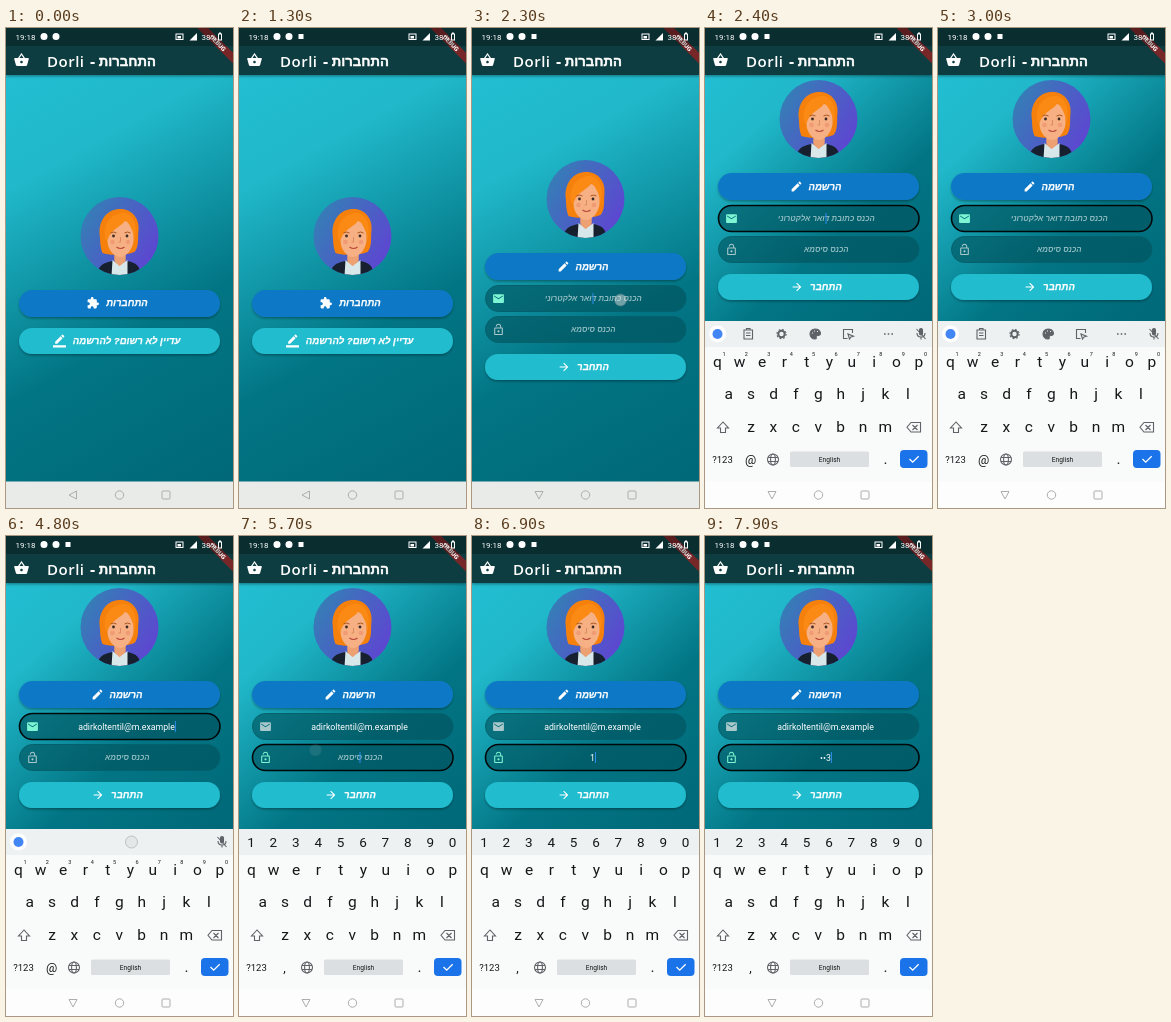
These frames come from a looping animation (227 by 480 pixels, 8000 ms). An HTML page:

```html
<!DOCTYPE html>
<html lang="he">
<head>
<meta charset="utf-8">
<title>התחברות</title>
<style>
html, body { margin: 0; width: 100%; height: 100%; overflow: hidden; background: #073c40; }
svg { display: block; width: 227px; height: 480px; }
text { font-family: Roboto, sans-serif; text-anchor: middle; }
.he { font-family: "Liberation Sans", "DejaVu Sans", sans-serif; font-weight: bold; direction: rtl; }
.label { font-size: 9.6px; font-style: italic; fill: #fff; stroke: #fff; stroke-width: .25; }
.hint { font-size: 7.8px; font-style: italic; fill: #8fbcc1; }
.value { font-size: 8.75px; fill: #fff; }
.key { font-size: 15.5px; fill: #161718; }
.line { fill: none; stroke: #5f6368; stroke-width: 1.1; }
.nav { fill: none; stroke: #adadad; stroke-width: 1; }
</style>
</head>
<body>
<svg id="stage" viewBox="0 0 227 480"></svg>
<script>
const EMAIL = 'adirkoltentil@m.example';
const LOOP = 8000;

const ICONS = {
  puzzle: 'M20.5 11H19V7c0-1.1-.9-2-2-2h-4V3.5C13 2.12 11.88 1 10.5 1S8 2.12 8 3.5V5H4c-1.1 0-2 .9-2 2v3.8h1.5c1.5 0 2.7 1.2 2.7 2.7s-1.2 2.7-2.7 2.7H2V20c0 1.1.9 2 2 2h3.8v-1.5c0-1.5 1.2-2.7 2.7-2.7s2.7 1.2 2.7 2.7V22H17c1.1 0 2-.9 2-2v-4h1.5c1.38 0 2.5-1.12 2.5-2.5S21.88 11 20.5 11z',
  pencil: 'M3 17.25V21h3.75L17.81 9.94l-3.75-3.75L3 17.25zM20.71 7.04c.39-.39.39-1.02 0-1.41l-2.34-2.34c-.39-.39-1.02-.39-1.41 0l-1.83 1.83 3.75 3.75 1.83-1.83z',
  underline: 'M17.75 7L14 3.25l-10 10V17h3.75l10-10zm2.96-2.96c.39-.39.39-1.02 0-1.41L18.37.29c-.39-.39-1.02-.39-1.41 0L15 2.25 18.75 6l1.96-1.96zM0 20h24v4H0z',
  arrow: 'M12 4l-1.41 1.41L16.17 11H4v2h12.17l-5.58 5.59L12 20l8-8z',
  mail: 'M20 4H4c-1.1 0-2 .9-2 2v12c0 1.1.9 2 2 2h16c1.1 0 2-.9 2-2V6c0-1.1-.9-2-2-2zm0 4l-8 5-8-5V6l8 5 8-5v2z',
  lock: 'M12 17c1.1 0 2-.9 2-2s-.9-2-2-2-2 .9-2 2 .9 2 2 2zm6-9h-1V6c0-2.76-2.24-5-5-5S7 3.24 7 6h1.9c0-1.71 1.39-3.1 3.1-3.1s3.1 1.39 3.1 3.1v2H6c-1.1 0-2 .9-2 2v10c0 1.1.9 2 2 2h12c1.1 0 2-.9 2-2V10c0-1.1-.9-2-2-2zm0 12H6V10h12v10z',
  basket: 'M17.21 9l-4.38-6.56c-.4-.56-1.26-.56-1.66 0L6.79 9H2c-.55 0-1 .45-1 1l2.58 9.54c.23.84 1 1.46 1.92 1.46h13c.92 0 1.69-.62 1.93-1.46L23 10c0-.55-.45-1-1-1h-4.79zM9 9l3-4.4L15 9H9zm3 8c-1.1 0-2-.9-2-2s.9-2 2-2 2 .9 2 2-.9 2-2 2z'
};

const icon = (name, x, y, size, fill = '#fff', id = '') =>
  `<path id="${id}" d="${ICONS[name]}" fill="${fill}" transform="translate(${x - size / 2} ${y - size / 2}) scale(${size / 24})"/>`;
const text = (s, x, y, cls = 'key', attrs = '') => `<text x="${x}" y="${y}" class="${cls}" ${attrs}>${s}</text>`;
const pill = (y, fill, h) =>
  `<rect x="13" y="${y}" width="201" height="${h}" rx="${h / 2}" fill="${fill}" filter="url(#drop)"/>`;
const field = (id, y, name, hint) => `
  <rect id="${id}Box" x="13.5" y="${y}" width="200.5" height="26" rx="13" fill="#00505a" fill-opacity=".6" stroke="#04606a"/>
  ${icon(name, 26.5, y + 13.2, 13, '#a9c8cb', id + 'Icon')}
  ${text(hint, 121.3, y + 15.3, 'he hint', `id="${id}Hint"`)}
  ${text('', 120.5, y + 16, 'value', `id="${id}Value"`)}
  <rect id="${id}Caret" y="${y + 7.5}" width="1" height="11" fill="#2e8df0"/>`;

const portrait = `
  <circle r="39" fill="url(#disc)"/>
  <g clip-path="url(#round)">
    <path d="M-20-3C-20-17-12-27 1-27C13-27 20-17 19-6C18 2 20 10 15 16C8 19-10 20-17 17C-20 9-19 4-20-3Z" fill="#f5800c"/>
    <path d="M-5 13h11v17h-11z" fill="#e89868"/>
    <path d="M-22 40C-22 30-17 27-7 25L0 33L8 25C17 27 21 30 21 40Z" fill="#17202e"/>
    <path d="M-7 24L0 30L8 24V40H-8Z" fill="#d8e8ea"/>
    <path d="M-5 24L0 30L6 24V17H-5Z" fill="#eda173"/>
    <path d="M-12-6C-12-18 13-20 14-5V5C13 14 6 21 1 21C-5 21-12 14-12 5Z" fill="#f6b084"/>
    <path d="M-14 4C-18-14-6-24 6-23C15-20 18-10 15 4C14-4 11-11 6-16C2-9-8-8-12 4Z" fill="#fb8a14"/>
    <path d="M-9-3q3-2 6 0M5-3q3-2 6 0" fill="none" stroke="#a8561e"/>
    <circle cx="-6" cy="0" r="1.400" fill="#3b2a25"/><circle cx="7.500" cy="0" r="1.400" fill="#3b2a25"/>
    <circle cx="-7" cy="6" r="2.300" fill="#f09b74"/><circle cx="8.500" cy="6" r="2.300" fill="#f09b74"/>
    <path d="M1 1v5h-2" fill="none" stroke="#da8b5f"/>
    <path d="M-3 11Q1 14 5 11" fill="none" stroke="#b94a3c" stroke-width="1.200"/>
  </g>`;

const row = (chars, x, y, size = 15.5) =>
  [...chars].map((c, i) => text(c, x + i * 22.4, y, 'key', `style="font-size:${size}px"`)).join('');
const digits = '1234567890';

const keyboard = `
  <rect y="293" width="227" height="161" fill="#f9fafa"/>
  <rect y="293" width="227" height="26" fill="#eef1f1"/>
  <g id="bar">
    <circle cx="12.500" cy="306" r="8.500" fill="#fff"/><circle cx="12.500" cy="306" r="5" fill="#4285f4"/>
    <g id="tools" class="line">
      <path d="M39 302h8.500v9h-8.500zM41.500 302v-1.500h3.500v1.500M41 305h4.500M41 307.500h4.500"/>
      <circle cx="76.500" cy="306" r="3.200" stroke-width="2"/><circle cx="76.500" cy="306" r="4.600" stroke-dasharray="1.800 1.810"/>
      <path d="M110 301a5 5 0 1 0 0 10q2 0 1-2q0-1.500 2-1.500q2.500 0 2.500-2.500q-1-4-5.500-4z" fill="#5f6368"/>
      <path d="M107 305h1M109 303h1M112 303.500h1" stroke="#eceff1"/>
      <path d="M147.500 305v-3.500h-9v9h4M143 306l1.500 5l1.500-2l2.500-.8z"/>
      <path d="M179 306h1.600M182.700 306h1.600M186.400 306h1.600" stroke-width="1.700"/>
    </g>
    <g class="line"><rect x="214.500" y="300.500" width="3" height="6.500" rx="1.500" fill="#5f6368"/>
    <path d="M212 305q0 4 4 4t4-4M216 309v2.500M211.500 301l9 10"/></g>
  </g>
  <g id="numbers">${row(digits, 12, 311.3, 13.5)}</g>
  ${row('qwertyuiop', 12.3, 338.8)}
  <g id="minis">${[...digits].map((c, i) => text(c, 19 + i * 22.4, 328, 'key', 'style="font-size:5.5px"')).join('')}</g>
  ${row('asdfghjkl', 23.7, 370.8)}
  ${row('zxcvbnm', 46, 403.7)}
  <path class="line" d="M18 394l-5.500 6h3v4.500h5v-4.500h3z"/>
  <path class="line" d="M206 394.500h9.500v9.500h-9.500l-4-4.750zM207.500 397l5 5M212.500 397l-5 5"/>
  ${text('?123', 17.5, 434.7, 'key', 'style="font-size:9.5px"')}
  ${text('@', 45.5, 435.5, 'key', 'id="side" style="font-size:12.5px"')}
  <g class="line"><circle cx="68" cy="431.500" r="5.500"/><ellipse cx="68" cy="431.500" rx="2.400" ry="5.500"/><path d="M63 429.500h10M63 433.500h10"/></g>
  <rect x="85" y="423.500" width="79" height="15.500" rx="1.500" fill="#dcdfe1"/>
  ${text('English', 124.5, 433.7, 'key', 'style="font-size:6.6px"')}
  ${text('.', 180.5, 436)}
  <rect x="195" y="422" width="27.500" height="18" rx="4" fill="#1a73e8"/>
  <path d="M204.500 431l3.200 3.200l6-6" fill="none" stroke="#fff" stroke-width="1.300"/>`;

const stage = document.getElementById('stage');
stage.innerHTML = `
  <defs>
    <linearGradient id="sea" gradientUnits="userSpaceOnUse" x1="0" y1="47" x2="227" y2="453">
      <stop stop-color="#22bed1"/><stop offset=".22" stop-color="#20b8ca"/>
      <stop offset=".62" stop-color="#027584"/><stop offset="1" stop-color="#006878"/>
    </linearGradient>
    <linearGradient id="disc" x2="1" y2=".6"><stop stop-color="#2f86b2"/><stop offset="1" stop-color="#5c48d0"/></linearGradient>
    <clipPath id="round"><circle r="39"/></clipPath>
    <filter id="drop" x="-10%" y="-30%" width="120%" height="180%">
      <feDropShadow dx="0" dy="1.500" stdDeviation="1.300" flood-opacity=".32"/>
    </filter>
  </defs>
  <rect y="47" width="227" height="407" fill="url(#sea)"/>
  <g id="content">
    <g id="face">${portrait}</g>
    <g id="landing">
      ${pill(262, '#1079c6', 27)}${icon('puzzle', 87, 275, 13)}${text('התחברות', 121, 278, 'he label')}
      ${pill(300, '#20bccf', 26)}${icon('underline', 53.5, 313, 13)}${text('עדיין לא רשום? להרשמה', 120.5, 316, 'he label')}
    </g>
    <g id="form">
      ${pill(225, '#1079c6', 27)}${icon('pencil', 91.5, 238.5, 13)}${text('הרשמה', 120, 241.5, 'he label')}
      ${field('mail', 257.5, 'mail', 'הכנס כתובת דואר אלקטרוני')}
      ${field('pass', 288.5, 'lock', 'הכנס סיסמא')}
      ${pill(326, '#20bccf', 26)}${icon('arrow', 92, 339, 13)}${text('התחבר', 121, 342, 'he label')}
    </g>
  </g>
  <g filter="url(#drop)"><rect width="227" height="47" fill="#073c40"/></g>
  ${icon('basket', 15.5, 32, 16)}
  ${text('Dorli', 41, 38.5, '', 'style="font:600 15px Open Sans,sans-serif;letter-spacing:.5px;text-anchor:start" fill="#fff"')}
  ${text('-', 86.5, 38.5, '', 'style="font:bold 16px Open Sans,sans-serif" fill="#fff"')}
  ${text('התחברות', 121.3, 38, 'he', 'font-size="13.2" fill="#fff" stroke="#fff" stroke-width=".4"')}
  <g transform="translate(211.900 15.100) rotate(45)">
    <rect x="-26" y="-3.800" width="52" height="7.600" fill="#b71c1c" fill-opacity=".63"/>
    ${text('DEBUG', 0, 2.2, '', 'font-size="6.2" font-weight="900" fill="#fff"')}
  </g>
  <rect width="227" height="18" fill-opacity=".25"/>
  <g fill="#fff">
    ${text('19:18', 19.5, 11.5, '', 'font-size="8"')}
    <circle cx="38" cy="8.500" r="3.500"/><circle cx="50" cy="8.500" r="3.500"/>
    <rect id="notice" x="59.500" y="6" width="5" height="5"/>
    <path d="M169.500 5.500h8v6.500h-8zM170.500 6.500v4.500h6v-4.500z" fill-rule="evenodd"/><path d="M171.500 8h3.500v2.500h-3.500z"/>
    <path d="M191 5v7.500h-7.500z"/>
    ${text('38%', 203, 11.5, '', 'font-size="8"')}
    <path d="M212 5.500h1v-1h2v1h1v7h-4zM213 6.500v5h2v-5z" fill-rule="evenodd"/>
  </g>
  <g id="keys">${keyboard}</g>
  <rect id="navBar" y="453.500" width="227" height="26.500"/>
  <path id="back" class="nav" d="M-4 0L3.500-4V4Z"/>
  <circle class="nav" cx="113.500" cy="467" r="4.200"/>
  <rect class="nav" x="156" y="463" width="8" height="8" rx="1"/>
  <circle id="touch" r="6" fill="#dfe3e4" stroke="#8d9698" stroke-width=".700"/>`;

const el = {};
stage.querySelectorAll('[id]').forEach(n => { if (n.id) el[n.id] = n; });
const show = (node, on) => node.setAttribute('visibility', on ? 'inherit' : 'hidden');
const move = (node, x, y, rest = '') => node.setAttribute('transform', `translate(${x} ${y}) ${rest}`);
const latest = (steps, t) => steps.reduce((last, s) => t >= s[0] ? s : last);

// [time, value]
const mailSteps = [[2250, ''], [3300, 'a'], [3600, 'ad'], [3900, 'adi'], [4700, EMAIL]];
const passSteps = [[5600, ''], [6700, '1'], [7300, '•2'], [7700, '••3']];
// [start, end, x, y, opacity]
const taps = [
  [2000, 2200, 150, 275, .4], [2200, 2400, 148.5, 272, .5],
  [3250, 3400, 24, 366, .3], [3550, 3700, 69, 366, .3], [3850, 4000, 169, 334, .3],
  [4700, 4900, 125.5, 306, .7], [5600, 5800, 76.5, 214, .1],
  [6600, 6800, 12, 307, .3], [7200, 7400, 34.5, 307, .3], [7600, 7800, 57, 307, .3]
];

function drawField(id, steps, t, focused, ring) {
  const [since, value] = latest(steps, t);
  const valueNode = el[id + 'Value'], caret = el[id + 'Caret'], box = el[id + 'Box'];
  if (valueNode.textContent !== value) valueNode.textContent = value;
  show(el[id + 'Hint'], !value);
  const width = value ? valueNode.getComputedTextLength() : 0;
  caret.setAttribute('x', 120.5 + width / 2);
  show(caret, focused && (t - since) % 1000 < 500);
  el[id + 'Icon'].setAttribute('fill', focused ? '#7df5d2' : '#a9c8cb');
  box.setAttribute('stroke', ring ? '#00080a' : '#04606a');
  box.setAttribute('stroke-width', ring ? 1.6 : 1);
}

function draw(t) {
  const open = t >= 2200, typing = t >= 2400, secret = t >= 5600;
  const bottom = typing ? 293 : 453;

  el.sea.setAttribute('y2', bottom);
  move(el.content, 0, (bottom - 453) / 2);
  move(el.face, 113.5, open ? 171 : 208);
  show(el.landing, !open);
  show(el.form, open);
  show(el.notice, t >= 500);
  move(el.back, 67, 467, `rotate(${open ? -90 : 0})`);
  el.navBar.setAttribute('fill', typing ? '#fdfdfd' : '#e9ebe9');

  drawField('mail', mailSteps, t, t >= 2250 && !secret, typing && !secret);
  drawField('pass', passSteps, t, secret, secret);

  show(el.keys, typing);
  show(el.bar, !secret);
  show(el.tools, t < 3300);
  show(el.numbers, secret);
  show(el.minis, !secret);
  el.side.textContent = secret ? ',' : '@';
  // nested parts must not outlive their hidden parents
  el.keys.style.display = typing ? '' : 'none';
  el.form.style.display = open ? '' : 'none';

  const tap = taps.find(p => t >= p[0] && t < p[1]);
  show(el.touch, tap);
  if (tap) {
    move(el.touch, tap[2], tap[3]);
    el.touch.setAttribute('opacity', tap[4]);
  }
}

const start = performance.now();
function tick() {
  draw((performance.now() - start) % LOOP);
  requestAnimationFrame(tick);
}
tick();
</script>
</body>
</html>
```
